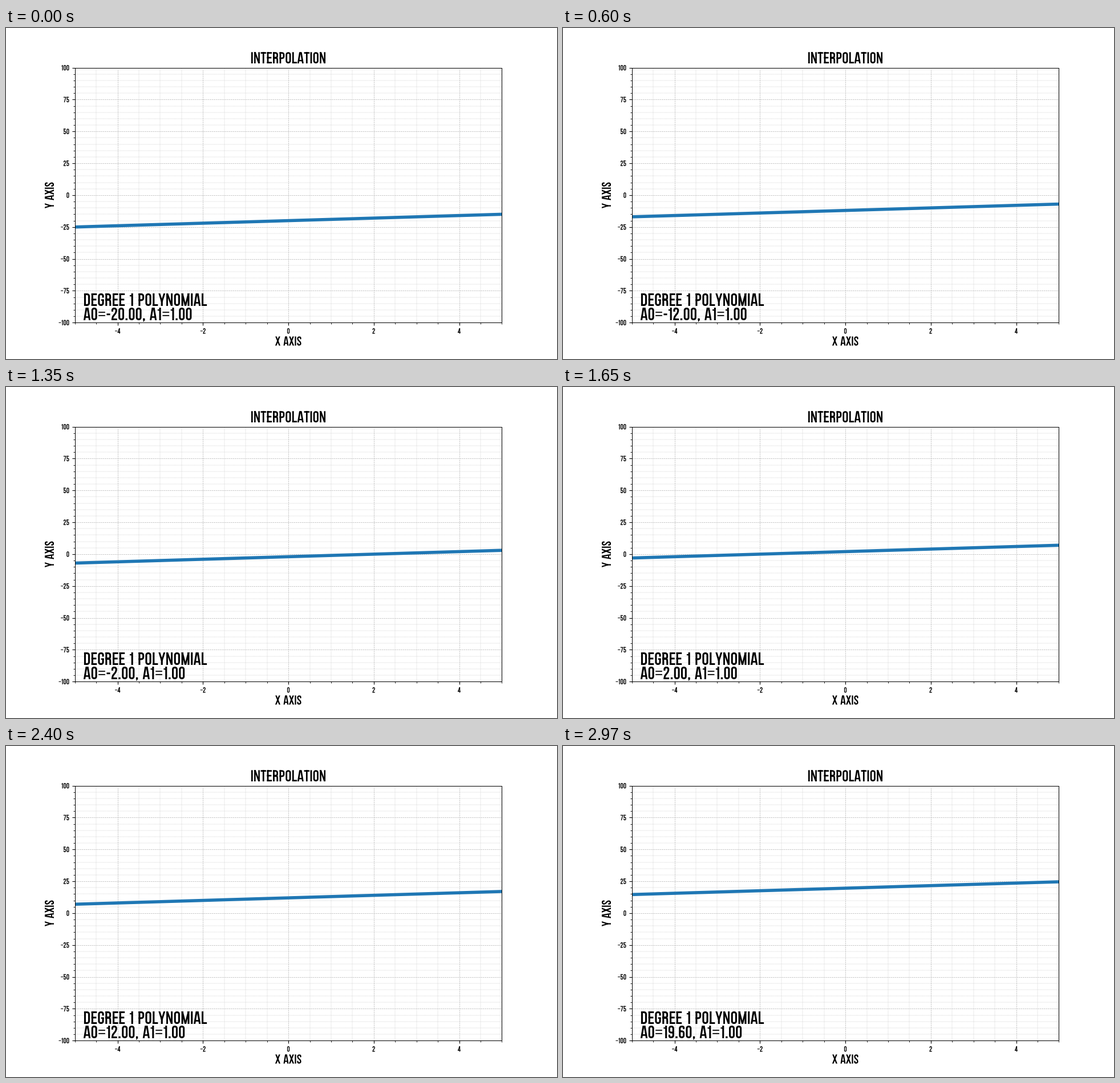
Animation, 966 px wide and 580 px high, one loop 3000 ms. Source, as a matplotlib script:

```python
import numpy as np
import matplotlib.pyplot as plt
from matplotlib.animation import FuncAnimation
from matplotlib.patches import PathPatch
from matplotlib.path import Path
from matplotlib.ticker import AutoMinorLocator
from matplotlib.transforms import Affine2D

W, H, DPI = 966, 580, 100
FRAMES, INTERVAL = 100, 30

# Condensed capitals: all lengths are in units of the cap height.
STEM = 0.14
TRACK = 0.006
RADIUS = 0.17


def bar(x0, y0, x1, y1, w=STEM):
    """Slanted bar with level ends."""
    return Path([(x0, y0), (x0 + w, y0), (x1 + w, y1), (x1, y1)])


def stem(x, w=STEM):
    return bar(x, 0, x, 1, w)


def arm(y, x0, x1, h=0.135):
    return bar(x0, y, x0, y + h, x1 - x0)


def bend(*pts):
    """Polyline with rounded inner corners."""
    pts = np.array(pts, float)
    verts, codes = [pts[0]], [Path.MOVETO]
    for a, p, b in zip(pts, pts[1:], pts[2:]):
        la, lb = np.hypot(*(a - p)), np.hypot(*(b - p))
        r = min(RADIUS, la / 2, lb / 2)
        verts += [p + (a - p) * r / la, p, p + (b - p) * r / lb]
        codes += [Path.LINETO, Path.CURVE3, Path.CURVE3]
    return Path(verts + [pts[-1]], codes + [Path.LINETO])


def loop(l, r, lo, hi):
    m = (lo + hi) / 2
    return bend((l, m), (l, hi), (r, hi), (r, lo), (l, lo), (l, m))


def bowl(r, lo, hi):
    return bend((0.06, hi), (r, hi), (r, lo), (0.06, lo))


LO, HI = 0.07, 0.93
L, R = 0.12, 0.43
TOP = 0.865

# character: (advance, filled parts, stroked parts)
LETTERS = {
    " ": (0.3, [], []),
    "A": (0.588, [bar(0.015, 0, 0.18, 1), bar(0.433, 0, 0.268, 1),
                  arm(0.19, 0.13, 0.46, 0.12)], []),
    "D": (0.58, [stem(0.06)], [bowl(0.452, LO, HI)]),
    "E": (0.525, [stem(0.06), arm(0, 0.06, 0.49), arm(0.44, 0.06, 0.45),
                  arm(TOP, 0.06, 0.49)], []),
    "G": (0.575, [arm(0.41, 0.30, 0.52, 0.12)],
          [bend((0.45, 0.66), (0.45, HI), (0.125, HI), (0.125, LO),
                (0.45, LO), (0.45, 0.5))]),
    "I": (0.252, [stem(0.056)], []),
    "L": (0.494, [stem(0.06), arm(0, 0.06, 0.475)], []),
    "M": (0.753, [stem(0.06), stem(0.553), bar(0.311, 0, 0.06, 1, 0.13),
                  bar(0.311, 0, 0.563, 1, 0.13)], []),
    "N": (0.619, [stem(0.06, 0.13), stem(0.429, 0.13),
                  bar(0.419, 0, 0.06, 1)], []),
    "O": (0.575, [], [loop(0.125, 0.45, LO, HI)]),
    "P": (0.545, [stem(0.06)], [bowl(0.435, 0.46, HI)]),
    "R": (0.575, [stem(0.06)], [bowl(0.44, 0.5, HI),
                                bend((0.06, 0.5), (0.44, 0.5), (0.45, 0))]),
    "S": (0.55, [], [bend((R, 0.7), (R, HI), (L, HI), (L, 0.62), (R, 0.38),
                          (R, LO), (L, LO), (L, 0.3))]),
    "T": (0.516, [stem(0.188), arm(TOP, 0.015, 0.5)], []),
    "X": (0.6, [bar(0.015, 0, 0.415, 1, 0.155),
                bar(0.43, 0, 0.03, 1, 0.155)], []),
    "Y": (0.575, [bar(0.217, 0, 0.217, 0.42), bar(0.217, 0.35, 0.015, 1),
                  bar(0.217, 0.35, 0.42, 1)], []),
}
FIGURES = {
    "0": (0.55, [], [loop(L, R, LO, HI)]),
    "1": (0.38, [stem(0.175), arm(0.76, 0.05, 0.2, 0.1)], []),
    "2": (0.55, [arm(0, 0.05, 0.49)],
          [bend((L, 0.68), (L, HI), (R, HI), (R, 0.62), (0.13, 0.25),
                (0.13, 0))]),
    "3": (0.55, [], [bend((L, 0.72), (L, HI), (R, HI), (R, 0.51), (0.24, 0.51)),
                     bend((0.24, 0.51), (R, 0.51), (R, LO), (L, LO),
                          (L, 0.28))]),
    "4": (0.55, [stem(0.31), bar(0.02, 0.2, 0.28, 1),
                 arm(0.18, 0.02, 0.52)], []),
    "5": (0.55, [arm(TOP, 0.07, 0.48), bar(0.07, 0.42, 0.07, 1)],
          [bend((0.13, 0.55), (R, 0.55), (R, LO), (L, LO), (L, 0.3))]),
    "6": (0.55, [], [bend((R, 0.72), (R, HI), (L, HI), (L, LO), (R, LO),
                          (R, 0.55), (L, 0.55))]),
    "7": (0.55, [arm(TOP, 0.04, 0.5), bar(0.13, 0, 0.36, 0.9)], []),
    "8": (0.55, [], [loop(L, R, 0.52, HI), loop(L, R, LO, 0.52)]),
    "9": (0.55, [], [bend((L, 0.28), (L, LO), (R, LO), (R, HI), (L, HI),
                          (L, 0.45), (R, 0.45))]),
    ".": (0.27, [arm(0, 0.06, 0.21, 0.15)], []),
    ",": (0.27, [arm(0, 0.06, 0.21, 0.15),
                 bar(0.06, -0.11, 0.12, 0.05, 0.09)], []),
    "-": (0.38, [arm(0.4, 0.05, 0.33, 0.13)], []),
    "\u2212": (0.5, [arm(0.44, 0.05, 0.48, 0.11)], []),
    "=": (0.65, [arm(0.33, 0.06, 0.59, 0.08), arm(0.59, 0.06, 0.59, 0.08)], []),
}
GLYPHS = {**LETTERS, **FIGURES}

fig = plt.figure(figsize=(W / DPI, H / DPI), dpi=DPI, facecolor="white")
# Pixel coordinates with y pointing down.
PIXELS = Affine2D().scale(1 / W, -1 / H).translate(0, 1) + fig.transFigure


class Label:
    """One line of text; align is 0 for left, 0.5 for centre, 1 for right."""

    def __init__(self, text, x, y, size, align=0.0, angle=0):
        self.pos, self.size, self.align, self.angle = (x, y), size, align, angle
        blank = Path(np.empty((0, 2)))
        self.fill = PathPatch(blank, fc="black", lw=0, transform=PIXELS, zorder=5)
        self.line = PathPatch(blank, fill=False, ec="black",
                              lw=STEM * size * 72 / DPI, capstyle="butt",
                              joinstyle="miter", transform=PIXELS, zorder=5)
        for patch in (self.fill, self.line):
            patch.set_snap(False)
            fig.add_artist(patch)
        self.set(text)

    def set(self, text):
        width = sum(GLYPHS[c][0] + TRACK for c in text)
        x = -self.align * width
        fills, lines = [], []
        for c in text:
            advance, solid, strokes = GLYPHS[c]
            move = (Affine2D().translate(x, 0).scale(self.size, -self.size)
                    .rotate_deg(self.angle).translate(*self.pos))
            fills += [move.transform_path(p) for p in solid]
            lines += [move.transform_path(p) for p in strokes]
            x += advance + TRACK
        self.fill.set_path(Path.make_compound_path(*fills))
        self.line.set_path(Path.make_compound_path(*lines))


ax = fig.add_axes([0.125, 0.11, 0.775, 0.77])
ax.set(xlim=(-5, 5), ylim=(-100, 100),
       xticks=range(-4, 5, 2), yticks=range(-100, 101, 25))
ax.xaxis.set_minor_locator(AutoMinorLocator(4))
ax.yaxis.set_minor_locator(AutoMinorLocator(5))
ax.tick_params(which="both", labelbottom=False, labelleft=False)
ax.spines[:].set_linewidth(0.72)
ax.set_axisbelow(True)
ax.grid(which="major", ls="--", lw=0.5, color="#b0b0b0")
ax.grid(which="minor", ls="--", lw=0.25, color="#b0b0b0")

left, right, top, bottom = 0.125 * W, 0.9 * W, 0.12 * H, 0.89 * H
mid_x, mid_y = (left + right) / 2, (top + bottom) / 2
TICK = 9.5
for v in range(-4, 5, 2):
    Label(str(v).replace("-", "\u2212"), mid_x + v * (right - left) / 10,
          bottom + 9.9 + TICK, TICK, align=0.5)
for v in range(-100, 101, 25):
    Label(str(v).replace("-", "\u2212"), left - 9.7,
          mid_y - v * (bottom - top) / 200 + TICK / 2, TICK, align=1)

Label("INTERPOLATION", mid_x, 62, 19.7, align=0.5)
Label("X AXIS", mid_x, 556.5, 16, align=0.5)
Label("Y AXIS", 84, mid_y, 16, align=0.5, angle=-90)
Label("DEGREE 1 POLYNOMIAL", 135.6, 487, 22)
coeffs = Label("", 135.6, 512, 22)

xs = np.linspace(-5, 5, 100)
curve, = ax.plot(xs, xs, lw=4, color="#1f77b4")


def update(i):
    a0, a1 = (i - 50) * 0.4, 1.0
    curve.set_ydata(a0 + a1 * xs)
    coeffs.set(f"A0={a0:.2f}, A1={a1:.2f}")
    return curve, coeffs.fill, coeffs.line


anim = FuncAnimation(fig, update, frames=FRAMES, interval=INTERVAL,
                     repeat=True, repeat_delay=0, blit=False)
plt.show()
```
